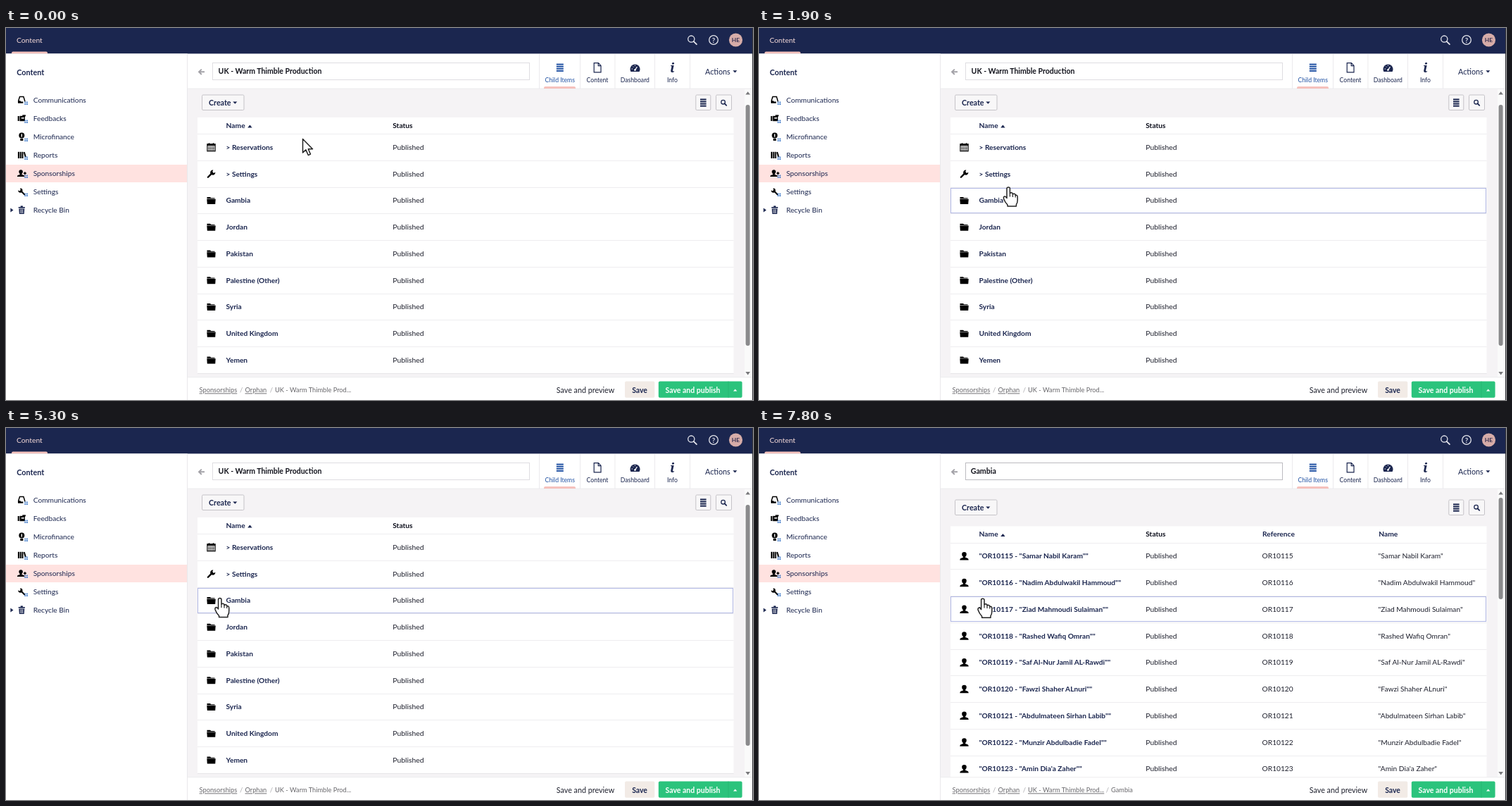
An HTML page for the animation above (8 s loop, 1061 px wide and 528 px high).

```html
<!DOCTYPE html>
<html lang="en">
<head>
<meta charset="utf-8">
<title>Content list</title>
<style>
html, body { margin: 0; width: 100%; height: 100%; overflow: hidden; background: #f5f3f5; }
svg { display: block; width: 1061px; height: 528px; }
text { font-family: Lato, "Open Sans", sans-serif; fill: #1b264f; white-space: pre; }
.b { font-weight: 700; }
.u { text-decoration: underline; }
.link { fill: #2152a3; text-decoration: underline; }
.url { font-family: "Open Sans", "Noto Sans", sans-serif; }
.mid { text-anchor: middle; }
</style>
</head>
<body>
<svg id="stage" viewBox="0 0 1061 528" xmlns="http://www.w3.org/2000/svg"></svg>
<script>
const LOOP = 8000, ROW = 37.75;
const NAVY = '#1b264f', BLUE = '#2152a3', INDIGO = '#3544b1', INK = '#1d1f2c';
const BACK = '#f5f3f5', LINE = '#e9e8eb', PINK = '#f5c1bc', GREY = '#68676b';

// Markup helpers
const rect = (x, y, w, h, fill, more = '') => `<rect x="${x}" y="${y}" width="${w}" height="${h}" fill="${fill}" ${more}/>`;
const path = (d, fill = '#000', more = '') => `<path d="${d}" fill="${fill}" ${more}/>`;
const stroke = (d, color, w = 1, more = '') => path(d, 'none', `stroke="${color}" stroke-width="${w}" ${more}`);
const circle = (x, y, r, fill, more = '') => `<circle cx="${x}" cy="${y}" r="${r}" fill="${fill}" ${more}/>`;
const text = (x, y, s, size = 10.3, cls = '', fill = '') =>
  `<text x="${x}" y="${y}" font-size="${size}" class="${cls}"${fill && ` style="fill:${fill}"`}>${s}</text>`;
const group = (id, body, more = '') => `<g id="${id}" ${more}>${body}</g>`;
const at = (x, y, body) => `<g transform="translate(${x} ${y})">${body}</g>`;
const down = (x, y, c = NAVY) => path(`M${x} ${y}h6l-3 3.4z`, c);
const up = (x, y, c = NAVY) => path(`M${x} ${y}h6.4l-3.2 -4z`, c);
const lens = (x, y, r, w, c) => circle(x, y, r, 'none', `stroke="${c}" stroke-width="${w}"`) +
  stroke(`M${x + r * .75} ${y + r * .75}l${r * .9} ${r * .9}`, c, w * 1.4, 'stroke-linecap="round"');
const bars = (x, y, w, c) => [0, 1, 2, 3].map(i => rect(x, y + i * 3.1, w, 2, c)).join('');

// Icons, centred on the origin
const wrench = stroke('M-4.6 4.6L1.5 -1.5', '#000', 2.4, 'stroke-linecap="round"') +
  path('M2.8 -5.6A3.6 3.6 0 1 0 5.8 -2.4L3.4 -1.2L1.6 -2.9Z');
const icon = {
  folder: path('M-6 -5h4.6l1 1.3H5v1H-6z') + path('M-6.2 -2.1H6.2L5.7 5H-5.7z'),
  person: path('M0 -6C4.6 -6 3.6 -.6 1.6 .8V1.8L5 3Q6.2 3.6 6.2 5.6H-6.2Q-6.2 3.6 -5 3L-1.6 1.8V.8C-3.6 -.6 -4.6 -6 0 -6Z'),
  check: stroke('M-5 .4L-1.6 3.6L5 -4', INDIGO, 2),
  wrench,
  calendar: rect(-5.6, -4.6, 11.2, 10, 'none', 'stroke="#000" stroke-width="1.2"') + rect(-5.6, -4.6, 11.2, 2.4, '#000') +
    stroke('M-3 -6.2v2M3 -6.2v2', '#000', 1.4) + stroke('M-4 -.6H4M-4 1.6H4M-4 3.8H4', '#000', 1.3, 'stroke-dasharray="1.4 .8"')
};
const tree = [
  ['Communications', stroke('M-4.6 3.4V1L-2.8 -4.8H2.6L4.4 1V2', '#000', 1.5) + path('M-5.3 .8H-2L-1 2.2H2V4.4H-5.3Z')],
  ['Feedbacks', rect(-5.6, -3.4, 2, 7, '#000') + rect(-2.8, -3.6, 7.4, 7.4, '#000') + rect(-.6, -1.4, 4, 1.6, '#fff') + rect(1, -5, 4.6, 2, '#000')],
  ['Microfinance', circle(0, -1.8, 4, '#000') + rect(-.7, -4, 1.4, 4.2, '#fff') + rect(-2, 2.6, 4, 3, '#000')],
  ['Reports', [-5.4, -2.6, .2].map(x => rect(x, -4.6, 2, 9.2, '#000')).join('') + path('M2.6 -4l1.8 -.6l2 7l-1.8 .8z')],
  ['Sponsorships', at(-1.2, 0, `<g transform="scale(.84)">${icon.person}</g>`) + rect(2.6, -1, 4, 1.5, '#000') + rect(3.8, -2.2, 1.5, 4, '#000')],
  ['Settings', `<g transform="scale(-.85 .85)">${wrench}</g>`],
  ['Recycle Bin', rect(-4.6, -4.4, 9.2, 1.6, NAVY) + rect(-1.6, -6, 3.2, 2, NAVY) + path('M-4 -2H4L3.4 5.6H-3.4Z', NAVY) +
    stroke('M-1.6 -1V4.6M0 -1V4.6M1.6 -1V4.6', '#fff', .7)]
];
const miniDots = [0, 1, 2, 3].map(i => rect(26.4 + i % 2 * 2.6, 1.6 + (i >> 1) * 2.6, 1.8, 1.8, '#3c78c8')).join('');

const topBar = rect(0, 0, 1061, 36.4, NAVY) + text(15, 20.6, 'Content', 10.3, '', '#f8dcd9') +
  path('M8 36.6v-1.2q0 -2 2 -2H57q2 0 2 2V36.6z', PINK) + lens(973.3, 15.6, 4.6, 1.3, '#e4e5ec') +
  circle(1005, 17, 6.3, 'none', 'stroke="#e4e5ec" stroke-width="1.3"') + text(1005, 20.6, '?', 9.8, 'b mid', '#e4e5ec') +
  circle(1036.5, 17, 9.6, '#d6aca8') + text(1036.5, 20, 'HE', 8.4, 'b mid', '#3a3353');

const sidebar = rect(0, 36.4, 257, 491.6, '#fff') + rect(257, 36.4, 1, 491.6, LINE) + text(15.3, 66.7, 'Content', 10.8, 'b') +
  rect(0, 194, 257, 25, '#ffe2e0') +
  tree.map(([name, art], i) =>
    at(0, 103 + i * 26, at(22.3, -.6, art) + (i < 6 ? miniDots : path('M6.4 -3.4l4 3l-4 3z', NAVY)) + text(38.7, 3.4, name, 10.2))
  ).join('');

const tabs = [
  [786.7, 'Child Items', bars(781.8, 50.6, 10, BLUE)],
  [840, 'Content', stroke('M835.2 49.6h6.2l3.6 3.8v9.4h-9.8zM841.2 49.8v3.8h3.6', NAVY, 1.2)],
  [893.4, 'Dashboard', path('M887.4 62A7 7 0 1 1 899.6 62Z', NAVY) + stroke('M893.4 59.6l3 -4.4', '#fff', 1.2) +
    circle(893.4, 59.6, 1.4, '#fff') + stroke('M888.6 58h1.4M890.4 54.6l1 1M893.4 52.6v1.4', '#fff', .9)],
  [946.4, 'Info', `<text x="946.4" y="62.6" font-size="18.5" class="b mid" style="font-family:'Noto Serif',serif;font-style:italic">i</text>`]
];
const editor = rect(258, 36.4, 803, 49.6, '#fff') + rect(258, 85.6, 803, .8, LINE) +
  stroke('M282 62.3H274.5M277.8 58.6L274 62.3L277.8 66', '#a3a2a8', 1.9) +
  group('field', rect(293.5, 49.5, 450, 24, '#fff')) +
  group('titleA', text(301.6, 65.2, 'UK - Warm Thimble Production', 10.5, 'b', '#12131c')) +
  group('titleB', text(300.8, 65.2, 'Gambia', 10.6, 'b', '#12131c')) +
  group('caret', rect(337, 54, 1, 15, '#111')) +
  [757, 815, 864.5, 921, 971].map(x => rect(x, 37, .9, 49, LINE)).join('') +
  tabs.map(([x, s, art], i) => art + text(x, 76.6, s, 8.65, 'mid', i ? '' : BLUE)).join('') +
  path('M764 86v-1q0 -2 2 -2H807q2 0 2 2v1z', PINK) +
  group('actions', text(993, 65.6, 'Actions', 10.8) + down(1032.4, 60.2));

const crumb = (x, s, link) => text(x, 517.4, s, 9.25, link ? 'u' : '', GREY);
const slash = x => text(x, 517.4, '/', 9.6, '', '#a5a4a8');
const parent = 'UK - Warm Thimble Prod...';
const footer = rect(258, 495.6, 803, 33, '#fff') + rect(258, 495.4, 803, .8, LINE) +
  crumb(274.6, 'Sponsorships', 1) + slash(332) + crumb(339.5, 'Orphan', 1) + slash(374.8) +
  group('crumbA', crumb(382, parent)) + group('crumbB', crumb(382, parent, 1) + slash(492.8) + crumb(500, 'Gambia')) +
  text(781.8, 517.6, 'Save and preview', 10.75, '', INK) +
  rect(879, 501.6, 42.3, 23.2, '#f2ebe6', 'rx="2"') + text(900, 517.6, 'Save', 10.4, 'b mid') +
  rect(926.8, 501.6, 118.8, 23.2, '#2bc37c', 'rx="2"') + rect(1025.6, 501.6, .8, 23.2, '#27b471') +
  text(936.6, 517.6, 'Save and publish', 10.5, 'b', '#fff') + path('M1033 515.4h5.4l-2.7 -3z', '#fff');

const toolbar = (dx, dy) => {
  const box = (x, w) => rect(x, 95 + dy, w, 21.5, '#f8f7f8', 'stroke="#c5c3c8" rx="1.5"');
  return box(278.5, 59.5) + text(288, 109.7 + dy, 'Create', 10.7, 'b') + down(322.3, 104.4 + dy) +
    box(979.8 + dx, 21) + bars(986 + dx, 100.4 + dy, 8.6, NAVY) +
    box(1008.5 + dx, 22) + lens(1018.6 + dx, 105.2 + dy, 2.8, 1.3, NAVY);
};
const scrollbar = (y, h) => rect(1049, 87, 11, 408, '#fafafa') + rect(1050.6, y, 6, h, '#8a8a8c', 'rx="3"') +
  path('M1050.4 94.6h6.6l-3.3 -4.4z', '#77777a') + path('M1050.4 488h6.6l-3.3 4.4z', '#77777a');

// Table geometry: first row edge, row centre
const head0 = top => top + 23.6, mid = (top, i) => head0(top) + ROW / 2 + ROW * i;
const table = (top, h, head, rows) => rect(272, top, 761.5, h, '#fff') + head + up(343.2, top + 14.5) +
  rows.map((r, i) => rect(272, Math.floor(head0(top) + i * ROW), 761.5, 1, '#eeedef') + at(0, mid(top, i), r)).join('');
const heads = (y, cols) => cols.map(([x, s]) => text(x, y, s, 10.25, 'b', s === 'Status' ? '#0d0f1c' : '')).join('');
const published = text(549.2, 3.6, 'Published', 10.4, '', INK);

const TOP_A = 126.9, TOP_B = 139.4;
const places = ['> Reservations', '> Settings', 'Gambia', 'Jordan', 'Pakistan', 'Palestine (Other)', 'Syria', 'United Kingdom', 'Yemen'];
const rowsA = places.map((s, i) => {
  const art = [icon.calendar, icon.wrench][i] || icon.folder;
  return at(291.5, 0, i === 2 ? group('plain', art) + group('ticked', icon.check) : art) +
    `<text class="b place" x="312.5" y="3.6" font-size="10.2">${s}</text>` + published;
});
const people = ['Samar Nabil Karam', 'Nadim Abdulwakil Hammoud', 'Ziad Mahmoudi Sulaiman', 'Rashed Wafiq Omran', 'Saf Al-Nur Jamil AL-Rawdi',
  'Fawzi Shaher ALnuri', 'Abdulmateen Sirhan Labib', 'Munzir Abdulbadie Fadel', "Amin Dia'a Zaher"];
const rowsB = people.map((s, i) => {
  const ref = 'OR' + (10115 + i);
  return at(291.5, 0, icon.person) + text(312.5, 3.6, `"${ref} - "${s}""`, 10.2, 'b') + published +
    text(714.6, 3.6, ref, 10.2, '', INK) + `<g clip-path="url(#cell)">${text(879.6, 3.6, `"${s}"`, 10.2, '', INK)}</g>`;
});
const bulk = rect(271.4, 87, 762.8, 37.6, INDIGO, 'rx="2"') + rect(285.4, 94, 90, 23, '#fff', 'rx="2"') +
  text(294.8, 109.6, 'Clear selection', 10.9) + text(382.6, 109.3, '1 of 9 selected', 10.1, 'b', '#fff');

const edge = 'stroke="#222" stroke-width="1.5" stroke-linejoin="round"';
const arrow = path('M0 0V19.4L4.4 15.4L7.8 23L11 21.6L7.8 14.2H14Z', '#fff', edge);
const hand = path('M-2.2 16V2.4Q-2.2 .6 0 .6Q2.2 .6 2.2 2.4V9Q4.6 7.2 6.2 9.4V10.4Q8.6 8.8 10 11.2V12Q12.9 10.8 13 14.4V19Q13 22.6 11.2 25V27.6H-1.2V25.6Q-5 21.6 -6.6 17Q-7.4 14 -5.2 13.4Q-3.6 13.4 -2.2 16Z', '#fff', edge) +
  stroke('M2.2 9V14M6.2 10V14.4M10 11.6V15', '#222', 1.2);
const url = 'https://n3oltd.n3o.cloud/umbraco/#/content/content/edit/1779?list=1550&amp;page=1&amp;filt...';

document.getElementById('stage').innerHTML =
  `<clipPath id="cell"><rect x="879" y="-15" width="143" height="30"/></clipPath>` +
  rect(0, 0, 1061, 528, BACK) +
  group('listA', scrollbar(109, 342) + group('toolsA', toolbar(0, 0)) +
    rect(272, 490, 761.5, 1, '#e3e2e5') +
    table(TOP_A, 363.2, heads(142, [[312.6, 'Name'], [549.2, 'Status']]), rowsA) + group('bulk', bulk)) +
  group('toolsLoading', toolbar(12, 7)) +
  group('listB', scrollbar(99, 144) + toolbar(0, 7) +
    group('tableB', table(TOP_B, 360, heads(154.2, [[312.6, 'Name'], [549.2, 'Status'], [715, 'Reference'], [880.2, 'Name']]), rowsB))) +
  rect(272.5, 0, 760, 35, 'none', 'id="outline"') +
  group('dots', [-11.4, 0, 11.4].map(x => circle(x, 0, 3, 'none', `stroke="${BLUE}" stroke-width="1.4"`)).join('')) +
  group('editor', editor + footer) + topBar + sidebar + rect(1060, 0, 1, 528, '#333338') +
  group('status', path('M0 515H349q2 0 2 2V528H0z', '#202124') + text(2.6, 525.4, url, 8.28, 'url', '#fff')) +
  group('arrow', arrow) + group('hand', hand);

const $ = id => document.getElementById(id);
const show = (id, on) => { $(id).style.display = on ? '' : 'none'; };
const within = (t, a, b) => t >= a && t < b;
const labels = [...document.querySelectorAll('.place')];
const bubbles = [...$('dots').children];

// Pointer tip: time, x, y; eased between stops
const stops = [[700, 421.5, 157.5], [1250, 328, 431], [1530, 352, 268], [2000, 354.5, 220], [2130, 354.5, 220],
  [2360, 349.5, 244], [3760, 349.5, 244], [3930, 303.6, 241], [5280, 303.6, 241], [5630, 317.8, 241.6]];
function tip(t) {
  const i = stops.findIndex(s => s[0] > t);
  if (i < 0) return stops[stops.length - 1].slice(1);
  if (!i) return stops[0].slice(1);
  const [a, ax, ay] = stops[i - 1], [b, bx, by] = stops[i];
  const k = (t - a) / (b - a), e = k * k * (3 - 2 * k);
  return [ax + (bx - ax) * e, ay + (by - ay) * e];
}

const LEAVE = 5800, OPEN = 6070, READY = 7460;

function drawDots(t) {
  show('dots', within(t, LEAVE, READY));
  const start = t < OPEN ? LEAVE : OPEN;
  $('dots').setAttribute('transform', `translate(658.2 ${t < OPEN ? 282.8 : 135.7})`);
  bubbles.forEach((c, i) => {
    const p = (t - start) / 1000 - i / 3;
    const d = Math.abs(p - Math.round(p));
    c.setAttribute('r', 1.1 + 1.8 * Math.min(1, d / .2));
  });
}

function drawHover(t) {
  const top = t < LEAVE ? TOP_A : TOP_B, picked = within(t, 2860, 4360);
  const [x, y] = tip(t - 35);
  const row = Math.floor((y - head0(top)) / ROW);
  const o = $('outline');
  show('outline', within(t, 30, LEAVE) || t >= READY + 90);
  o.setAttribute('y', Math.round(head0(top) + row * ROW + .7) + .5);
  o.setAttribute('stroke', picked ? '#5f6ac2' : '#b0b7e4');
  labels.forEach((l, i) => {
    const on = i === row && Math.abs(y - mid(TOP_A, i)) < 9 && x > 312 && x < 312.5 + l.getComputedTextLength();
    l.classList.toggle('link', on && !picked);
  });
  show('bulk', picked);
  show('toolsA', !picked);
  show('ticked', picked);
  show('plain', !picked);
  $('actions').style.opacity = picked ? .3 : 1;
}

function draw() {
  const t = performance.now() % LOOP, opened = t >= OPEN;
  const [x, y] = tip(t);
  show('listA', t < LEAVE);
  show('editor', t < LEAVE || opened);
  show('toolsLoading', within(t, OPEN, READY));
  show('listB', t >= READY);
  $('tableB').style.opacity = Math.min(1, Math.max(0, (t - READY + 40) / 160));
  for (const id of ['titleA', 'crumbA']) show(id, !opened);
  for (const id of ['titleB', 'crumbB']) show(id, opened);
  show('caret', opened && Math.floor((t - OPEN) / 530) % 2 === 0);
  $('field').setAttribute('stroke', opened ? '#bcbbc0' : '#dedde1');
  show('status', within(t, 5540, 5940));
  drawDots(t);
  drawHover(t);
  show('arrow', t < 30);
  show('hand', t >= 30);
  for (const id of ['arrow', 'hand']) $(id).setAttribute('transform', `translate(${x} ${y})`);
  requestAnimationFrame(draw);
}
draw();
</script>
</body>
</html>
```
